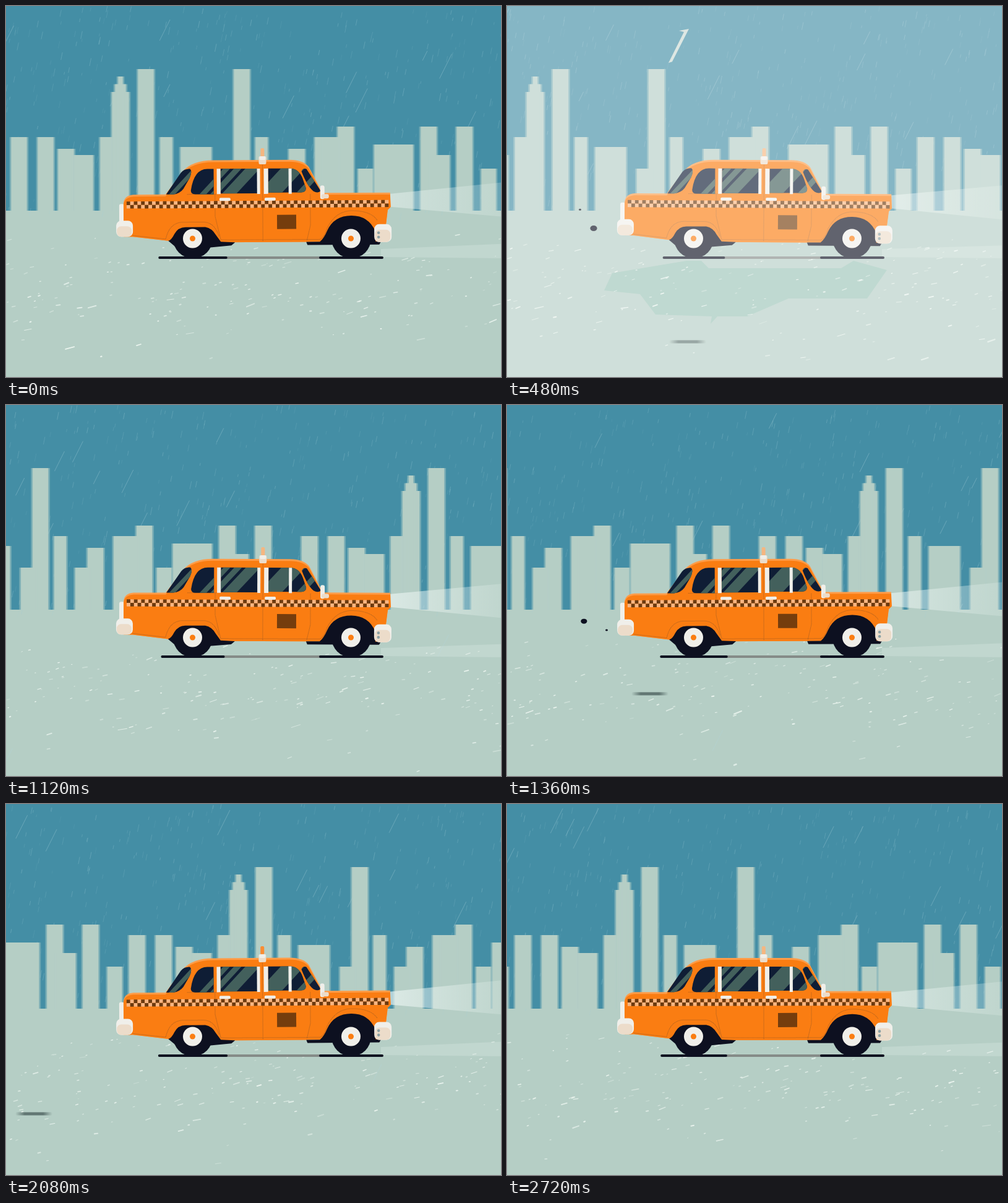
Recreate the animation shown at these times as an HTML page with a canvas. Size 800x600 px, loop 2760 ms.

```html
<!DOCTYPE html>
<html lang="en">
<head>
<meta charset="utf-8">
<title>Taxi in the rain</title>
<style>
  html, body { margin: 0; width: 100%; height: 100%; overflow: hidden; background: #b5cec5; }
  canvas { display: block; }
</style>
</head>
<body>
<canvas id="stage" width="800" height="600"></canvas>
<script>
const ctx = document.getElementById('stage').getContext('2d');
const LOOP = 2760, STEP = 40, HORIZON = 331;
const SKY = '#448ea5', GROUND = '#b5cec5', ORANGE = '#fa7d12', NAVY = '#0f1d35',
      BLACK = '#0d1020', WHITE = '#f0efea', BEIGE = '#ecdcca', BROWN = '#6b3a10';

// Buildings of one kind share a top and a width: [top, width, ...left edges]
const buildings = [
  [102, 26, 213, 368], [195, 26, 536, 670, 728], [212, 26, 8, 51, 499, 512],
  [212, 20, 152, 249, 403], [224, 63, 595], [228, 50, 282], [231, 26, 84, 457],
  [241, 32, 109, 685], [263, 24, 349, 437, 569, 768]
];
const puffPairs = [345, 1270, 1755, 2270];
// time, x, y of spots sweeping past on the road
const spots = [[480, 292, 543], [1360, 231, 467], [1800, 689, 501]];

const shape = {
  body: 'M190 372V318Q191 305 206 304H258L286 267Q301 249 335 249H458Q481 249 490 261L512 303H621L622 326 617 331 614 355V382H345L262 379 205 372Z',
  arches: 'M262 379Q267 378 272 368Q278 357 290 357H322Q333 359 339 370L347 381 370 382 364 387 330 390H275Z' +
          'M485 382H507Q514 376 519 364Q530 340 558 340Q586 340 597 366V382H606L603 387H487Z',
  glass: 'M259 304L283 269Q289 262 298 263Q302 267 297 278L287 295Q281 303 270 304Z' +
         'M299 298Q304 263 326 263H336V304H306Q299 304 299 298Z' +
         'M347 263H407V303H347ZM424 263H459Q474 263 480 280L485 295Q485 302 477 302H424Z' +
         'M478 268Q480 262 486 264L509 300Q504 304 497 300Q487 292 478 268Z',
  seams: 'M338 305V340L347 378H507Q514 376 519 360Q532 333 558 332Q590 332 600 348' +
         'M415 257V380M492 305V355L486 380M205 370L258 376Q264 350 285 349H320Q337 350 344 372M293 304H340',
  reflection: 'M157 460L170 432 290 412H314L326 424H540L560 412 614 427 582 473H455L388 502H340L329 514 331 502 240 499 215 466Z',
  bolt: 'M278 40L294 37 267 90 261 92 286 42Z'
};
for (const key in shape) shape[key] = new Path2D(shape[key]);

function random(seed) {
  let s = seed * 7919 + 17;
  return () => {
    s = s + 0x6D2B79F5 | 0;
    let r = Math.imul(s ^ s >>> 15, 1 | s);
    r = r + Math.imul(r ^ r >>> 7, 61 | r) ^ r;
    return ((r ^ r >>> 14) >>> 0) / 4294967296;
  };
}

function fill(path, color) { ctx.fillStyle = color; ctx.fill(path); }
function box(x, y, w, h, color, r = 0) {
  ctx.fillStyle = color;
  ctx.beginPath();
  ctx.roundRect(x, y, w, h, r);
  ctx.fill();
}
function oval(x, y, rx, ry, color) {
  ctx.fillStyle = color;
  ctx.beginPath();
  ctx.ellipse(x, y, rx, ry, 0, 0, 7);
  ctx.fill();
}
function line(x1, y1, x2, y2, color, width) {
  ctx.strokeStyle = color;
  ctx.lineWidth = width;
  ctx.beginPath();
  ctx.moveTo(x1, y1);
  ctx.lineTo(x2, y2);
  ctx.stroke();
}

function building(left, top, width, t) {
  const span = 795;
  const x = ((left - t * .2905 + 60) % span + span) % span - 60;
  for (const px of [x, x + span]) {
    // soft edges stand for motion blur
    for (const blur of [2.5, 1, -.5]) {
      ctx.globalAlpha = blur < 0 ? 1 : .35;
      box(px - blur, top, width + 2 * blur, HORIZON - top, GROUND);
    }
  }
}

function skyline(t) {
  for (const [top, width, ...lefts] of buildings)
    for (const left of lefts) building(left, top, width, t);
  for (let i = 0; i < 3; i++) building(171 + 5 * i, 139 - 12.5 * i, 28 - 10 * i, t);
}

function rain(rnd) {
  for (let i = 0; i < 430; i++) {
    const x = rnd() * 810, y = rnd() * 335, len = 4 + rnd() * 9;
    line(x, y, x - len * .2, y + len, `rgba(160,205,215,${.08 + rnd() * .25})`, 1);
  }
  for (let i = 0; i < 13; i++) {
    const x = rnd() * 820, y = rnd() * (i < 10 ? 200 : 560), len = 15 + rnd() * 28;
    line(x, y, x - len * .5, y + len, 'rgba(175,212,220,.35)', 1);
  }
}

function splashes(rnd) {
  ctx.lineCap = 'round';
  for (let i = 0; i < 170; i++) {
    const depth = (rnd() + rnd() * rnd()) / 2, x = rnd() * 800, y = 370 + depth * 240;
    const len = 1 + rnd() * rnd() * (9 + depth * 9), slope = .12 + rnd() * .3;
    line(x, y, x + len, y - len * slope, `rgba(240,248,243,${.3 + rnd() * .6})`, .8 + rnd() * (.8 + depth));
  }
  ctx.lineCap = 'butt';
}

function beam(pitch, flicker) {
  const glow = ctx.createLinearGradient(620, 0, 800, 0);
  glow.addColorStop(0, `rgba(240,248,246,${.45 + flicker * .25})`);
  glow.addColorStop(1, 'rgba(230,242,238,.22)');
  const dy = pitch * 7;
  fill(new Path2D(`M621 ${305 + dy / 2}L800 ${288 + dy}V${343 + dy}L621 ${326 + dy / 2}Z`), glow);
  fill(new Path2D(`M606 393L800 ${386 + dy / 2}V408L606 406Z`), 'rgba(225,240,236,.25)');
}

function windows() {
  ctx.save();
  fill(shape.glass, NAVY);
  ctx.clip(shape.glass);
  for (const [x, width] of [[268, 7], [318, 8], [336, 9], [360, 17], [425, 28], [474, 9]])
    line(x - 10, 315, x + 52, 249, '#43605c', width);
  ctx.restore();
  for (const [x, width] of [[341, 6], [406, 5], [417, 7], [457, 5]]) box(x, 263, width, 41, WHITE);
}

function shell() {
  ctx.save();
  fill(shape.body, '#ff9c48');
  ctx.clip(shape.body);
  ctx.translate(0, 3);
  fill(shape.body, ORANGE);
  ctx.restore();
  fill(shape.arches, BLACK);
  ctx.strokeStyle = 'rgba(115,75,40,.65)';
  ctx.lineWidth = 1;
  ctx.setLineDash([1, 1]);
  ctx.stroke(shape.seams);
  ctx.setLineDash([]);
}

function checkers() {
  for (let i = 0; i < 72; i++)
    for (let row = 0; row < 2; row++)
      box(195 + i * 5.88, 315 + row * 5.7, 5.9, 5.7, (i + row) % 2 ? '#f7b683' : BROWN);
}

function bumper(x, y, w, h) {
  box(x, y, w, h, WHITE, 8);
  box(x + 1, y + 9, w - 3, h - 9, BEIGE, 7);
}

function car(t, pitch) {
  const wheels = [302, 558];
  for (const x of wheels) oval(x, 376, 32, 32, BLACK);

  ctx.save();
  ctx.translate(400, 340);
  ctx.rotate(pitch * Math.PI / 180);
  ctx.translate(-400, -340);
  box(183, 319, 8, 32, WHITE, 3);
  shell();
  windows();
  checkers();
  box(438, 338, 31, 23, '#753d0d');
  for (const x of [345, 418]) box(x, 310, 18, 5, WHITE, 2);
  box(508, 291, 7, 22, WHITE, 3);
  box(510, 305, 12, 7, BEIGE, 3);
  box(412, 230, 6, 14, t >= 1720 && t < 2500 ? '#fa8c32' : '#f5b680', 2);
  box(409, 243, 12, 13, BEIGE, 2);
  box(410, 243, 10, 6, WHITE, 2);
  bumper(178, 346, 27, 26);
  bumper(595, 354, 28, 29);
  for (const y of [368, 375]) oval(602, y, 2.3, 2.3, '#8aa0a3');
  ctx.restore();

  for (const x of wheels) {
    oval(x - .5, 376, 15.5, 15.5, WHITE);
    oval(x - .5, 376, 4.5, 4.5, ORANGE);
  }
}

function tracks(pitch) {
  const rear = 53 - 8 * pitch, front = 52;
  line(340, 407, 520, 407, '#858b88', 4);
  ctx.lineCap = 'round';
  line(304 - rear, 407, 300 + rear, 407, BLACK, 4);
  line(560 - front, 407, 556 + front, 407, BLACK, 4);
  ctx.lineCap = 'butt';
}

function puff(age) {
  const u = age / 125;
  if (u < 0 || u > 1.1) return;
  const x = 118 + 43 * Math.max(0, 1 - u) ** 1.5, y = 364 - 10 * u - 19 * u ** 3;
  const r = 2 + 4 * Math.sin(Math.PI * Math.min(u, 1));
  oval(x, y, r, r * .8, BLACK);
}

function roadSpots(t) {
  for (const [time, x, y] of spots) {
    const px = x - (t - time) * 2.3;
    if (px < -60 || px > 700) continue;
    const rx = Math.min(30, 5 + (700 - px) / 5);
    const smear = ctx.createLinearGradient(px - rx, 0, px + rx, 0);
    for (const [at, alpha] of [[0, 0], [.25, .75], [.75, .75], [1, 0]])
      smear.addColorStop(at, `rgba(70,90,88,${alpha})`);
    box(px - rx, y - 2.5, rx * 2, 5, smear, 2.5);
  }
}

function draw(t) {
  const rnd = random(t / STEP + 1);
  const pitch = -.3 + .65 * Math.cos(2 * Math.PI * (t * 4 / LOOP - .74));
  const flash = t >= 440 && t < 680 ? .42 * (1 - (t - 440) / 240) : 0;

  box(0, 0, 800, HORIZON, SKY);
  box(0, HORIZON, 800, 600 - HORIZON, GROUND);
  rain(rnd);
  skyline(t);
  ctx.globalAlpha = Math.min(1, flash / .35);
  fill(shape.reflection, '#9dc4b8');
  ctx.globalAlpha = 1;
  splashes(rnd);
  roadSpots(t);
  beam(pitch, rnd());
  tracks(pitch);
  for (const birth of puffPairs) {
    puff(t - birth);
    puff(t - birth - 90);
  }
  car(t, pitch);

  if (flash) {
    box(0, 0, 800, 600, `rgba(255,255,255,${flash})`);
    if (t < 560) fill(shape.bolt, '#dde7e3');
  }
}

const start = performance.now();
function tick() {
  const t = (performance.now() - start) % LOOP;
  draw(Math.floor(t / STEP) * STEP);
  requestAnimationFrame(tick);
}
tick();
</script>
</body>
</html>
```
